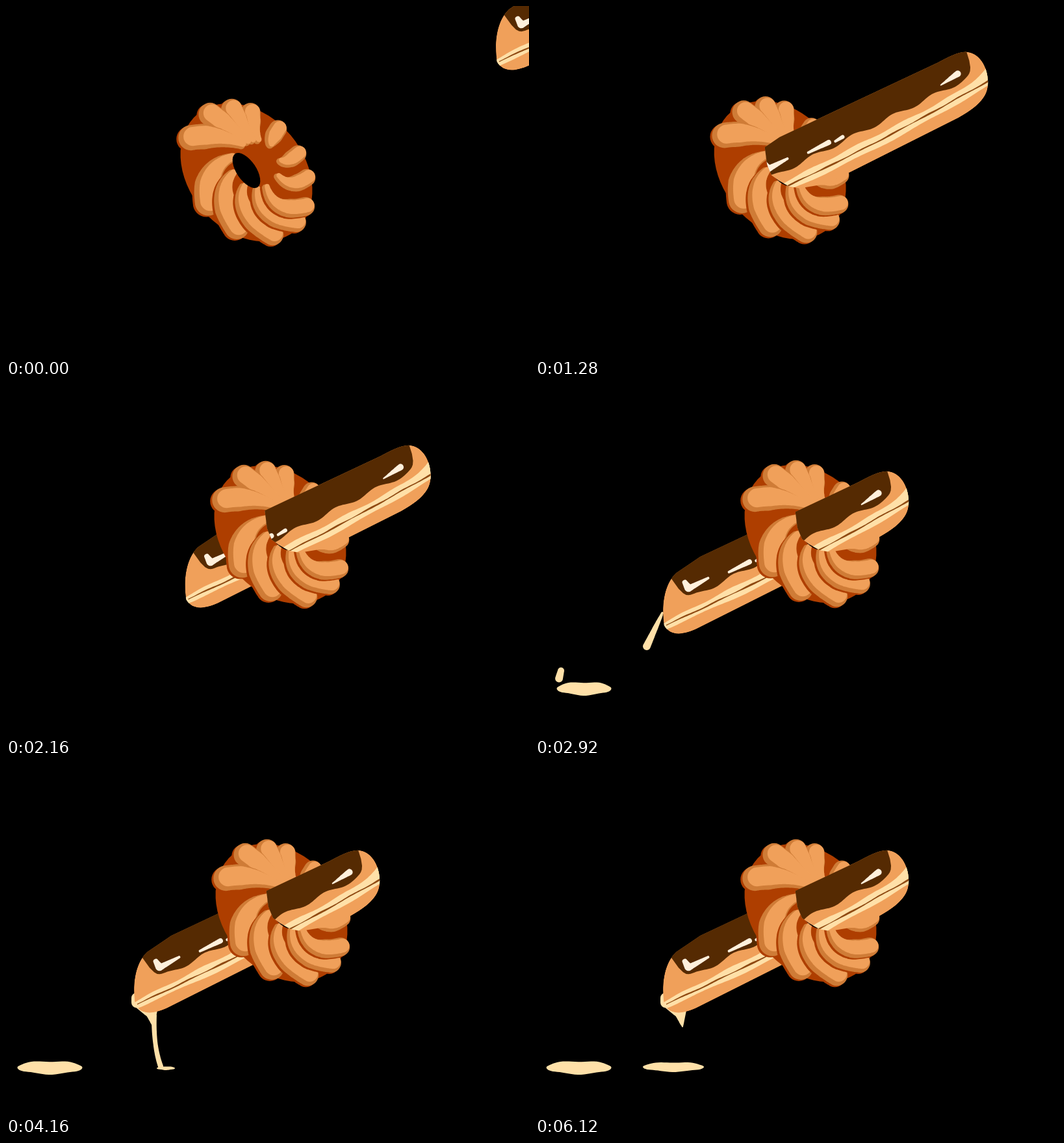
These frames come from a looping animation (805x540 px, 6240 ms). An HTML page with a canvas:

```html
<!DOCTYPE html>
<html lang="en">
<head>
<meta charset="utf-8">
<title>Pastries</title>
<style>
html, body { margin: 0; width: 100%; height: 100%; overflow: hidden; background: #000; }
canvas { display: block; }
</style>
</head>
<body>
<canvas id="stage" width="805" height="540"></canvas>
<script>
const ctx = document.getElementById('stage').getContext('2d');
const LOOP = 6240, STEP = 40, BEAT = 667;
const LIGHT = '#f0a05a', SHADE = '#cf7c37', DARK = '#ae3e00', CHOC = '#552a02',
  CREAM = '#ffe0a8', SHINE = '#fff0dc', SEAM = '#8f4a12';
const { PI, sin, cos, abs, min, max, hypot } = Math;

const rad = deg => deg * PI / 180;
const clamp = (v, lo, hi) => min(hi, max(lo, v));
const lerp = (a, b, k) => a + (b - a) * k;
const mix = (p, q, k) => [lerp(p[0], q[0], k), lerp(p[1], q[1], k)];
const ramp = (t, from, to) => (1 - cos(PI * clamp((t - from) / (to - from), 0, 1))) / 2;
const swing = (t, from, to, size) => size * (1 - cos(2 * PI * (clamp(t, from, to) - from) / BEAT)) / 2;

function fill(color, path) {
  ctx.fillStyle = color;
  ctx.fill(path);
}

function place(x, y, drawPart) {
  ctx.save();
  ctx.translate(x, y);
  drawPart();
  ctx.restore();
}

// Round-ended brush stroke along a curve; radius is a function of progress.
function brush(a, c, b, radius) {
  const path = new Path2D();
  for (let i = 0; i <= 40; i++) {
    const k = i / 40, [x, y] = mix(mix(a, c, k), mix(c, b, k), k), r = radius(k);
    path.moveTo(x + r, y);
    path.arc(x, y, r, 0, 2 * PI);
  }
  return path;
}
const taper = (a, b, r0, r1) => brush(a, mix(a, b, .5), b, k => lerp(r0, r1, k));

// Band between two edges, each a function of u and of progress s.
function strip(u0, u1, top, bottom) {
  const path = new Path2D();
  for (let i = 0; i <= 200; i++) {
    const s = min(i, 200 - i + i * 0) / 200;
  }
  const edge = (f, i) => path.lineTo(lerp(u0, u1, i / 120), f(lerp(u0, u1, i / 120), i / 120));
  for (let i = 0; i <= 120; i++) edge(top, i);
  for (let i = 120; i >= 0; i--) edge(bottom, i);
  return path;
}

// Twisted ring: each lobe winds from the hole out to the tilted oval rim.
function rim(deg, scale = 1, inset = 0) {
  const a = rad(deg), d = rad(deg - 50);
  const r = 124 * 95 / hypot(95 * cos(d), 124 * sin(d)) * scale - inset;
  return [370 + r * cos(a), 256 + r * sin(a)];
}
const tips = [142, 100, 67, 45, 30, 5, -20, -54, -86, -103, -122, -148];
const lobes = tips.map(tip => {
  const twist = 30 + 30 * cos(rad(tip - 110)), root = rad(tip + twist);
  const r = 17 + 4 * cos(rad(tip - 160));
  const leaf = scale => brush([383 + 38 * cos(root), 245 + 38 * sin(root)],
    rim(tip + .8 * twist, .62), rim(tip, 1, r), k => r * scale * min(1, .35 + .9 * k));
  return { full: leaf(1), lit: leaf(.75) };
});
const ringBase = new Path2D();
ringBase.ellipse(370, 256, 117, 89, rad(50), 0, 2 * PI);
const hole = new Path2D();
hole.ellipse(370, 253, 31, 15, rad(56), 0, 2 * PI);

function drawRing() {
  fill(DARK, ringBase);
  for (const { full, lit } of lobes) {
    place(-3, 2, () => fill(DARK, full));
    fill(SHADE, full);
    place(3, -2, () => fill(LIGHT, lit));
  }
  fill('#000', hole);
}

// Eclair, drawn along its own axis.
const body = new Path2D(`M-165-46C-190-38-208-10-217 18C-216 34-204 44-175 45L140 44C185 42 198 30 205 15
  C216-8 212-32 196-41C185-47 165-46 150-46L16-49-120-52Z`);
const filling = strip(-220, 215,
  (u, s) => 14 - 4 * s - 16 * s ** 12 + sin(u / 13),
  (u, s) => 24 + 8 * sin(PI * s) - 4 * s + sin(u / 19));
const icing = strip(-175, 197, () => -70,
  (u, s) => -2 - 2 * s + 3 * sin(u / 11) - 40 * abs(2 * s - 1) ** 40);
const seam = strip(-214, 207,
  (u, s) => 18 + 5 * sin(PI * s) - 5 * s + sin(u / 9) / 2,
  (u, s) => 20 + 5 * sin(PI * s) - 5 * s + sin(u / 14) / 2);
const shines = [
  taper([-159, -27], [-158, -17], 4, 6),
  taper([-157, -16], [-124, -17], 5, 2),
  taper([-91, -11], [-56, -11], 2, 4),
  taper([-46, -8], [-33, -9], 2, 3),
  taper([138, -13], [169, -17], 1, 5)
];

function drawEclair() {
  ctx.save();
  ctx.translate(385, 257);
  ctx.rotate(rad(-26.5));
  ctx.clip(body);
  fill(LIGHT, body);
  fill(CREAM, filling);
  fill(SEAM, seam);
  fill(CHOC, icing);
  shines.forEach(s => fill(SHINE, s));
  ctx.restore();
}

// The part of the eclair that lies in front of the ring.
const front = new Path2D('M346-500V217L350 247 357 264 368 272 384 281 400 284 430 279H1600V-500Z');

function puddle(x, y, w, h, tilt = 0) {
  const path = new Path2D();
  for (let a = 0; a < 2 * PI; a += .1) {
    const px = w * cos(a), py = h * sin(a) * (.9 + .1 * sin(5 * a));
    path.lineTo(x + px * cos(tilt) - py * sin(tilt), y + px * sin(tilt) + py * cos(tilt));
  }
  fill(CREAM, path);
}

function drawCream(t) {
  // Jet from the tip, its last drop and the tail it leaves behind.
  const arc = k => [196 - 158 * k, 352 + 90 * k * k];
  const head = ramp(t, 2380, 2640), tail = ramp(t, 2600, 2860);
  if (t > 2380 && t < 2860) fill(CREAM, taper(arc(tail), arc(head), 4, 7));
  if (t > 2600 && t < 3060) {
    const y = 424 + 40 * ramp(t, 2800, 3060);
    fill(CREAM, taper([40, y - 2], [37, y + 10], 5, 6));
  }
  if (t > 2680 && t < 3240) {
    const end = mix(mix([120, 385], [172, 402], ramp(t, 2680, 2920)), [200, 362], ramp(t, 2920, 3240));
    fill(CREAM, brush([196, 351], [186, 372], end, k => 2 + 4 * k));
  }
  const pool = ramp(t, 2600, 2760), spread = ramp(t, 3000, 3360);
  if (pool) puddle(lerp(75.5, 67.5, spread), 467, lerp(42, 50, spread) * pool, 11 * pool);

  // Slow drip: cap under the tip, thread to the ground, then a second puddle.
  const cap = ramp(t, 3600, 3900), reach = ramp(t, 3720, 4100), drop = ramp(t, 4760, 5000);
  if (cap) {
    fill(CREAM, taper([201, 360], [201, 367], 8 * cap, 8 * cap));
    fill(CREAM, taper([203, 368], [221, 379], 7 * cap, 10 * cap));
    fill(CREAM, taper([223, 379], [227, 379 + 25 * cap], 10 * cap, 1));
  }
  if (reach && drop < 1) {
    const end = mix([227, 385], [238, 465], reach);
    const top = mix([228, 388], end, drop);
    fill(CREAM, brush(top, [227, lerp(top[1], end[1], .6)], end, k => 3.5 + abs(k - .5)));
  }
  const foot = ramp(t, 4040, 4140), flow = ramp(t, 4880, 5200);
  if (foot) puddle(lerp(246, 213, flow), lerp(468, 466, flow), lerp(14, 47, flow) * foot,
    lerp(3, 8, flow), .25 * sin(PI * flow));
}

function draw(t) {
  ctx.fillStyle = '#000';
  ctx.fillRect(0, 0, 805, 540);
  const eclair = t < 1011 ? 557 * (1 - ramp(t, 120, 1011)) : swing(t, 1011, 1011 + 2 * BEAT, 134);
  const ring = swing(t, 534, 534 + 2.5 * BEAT, 54);
  const sway = t < 4160 ? 0 : .75 * (cos(2 * PI * (t - 4160) / 1920) - 1);

  drawCream(t);
  place(eclair + sway, -.51 * eclair, drawEclair);
  place(ring + sway, -ring / 2, () => {
    drawRing();
    ctx.clip(front);
    place(eclair - ring, ring / 2 - .51 * eclair, drawEclair);
  });
}

const start = performance.now();
function tick() {
  const t = (performance.now() - start) % LOOP;
  draw(Math.floor(t / STEP) * STEP);
  requestAnimationFrame(tick);
}
tick();
</script>
</body>
</html>
```
